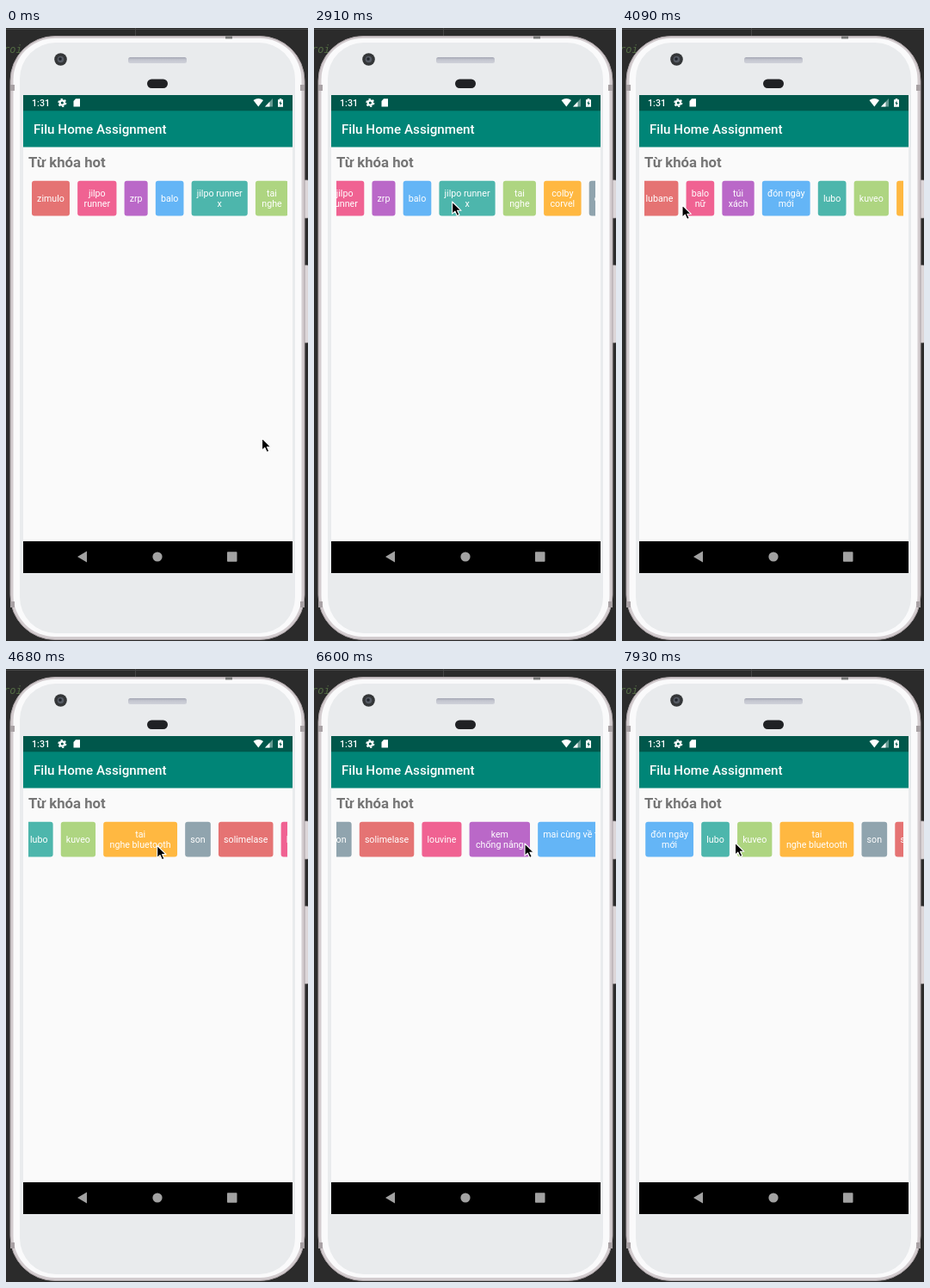
An HTML page that plays this animation: 351x713 px, repeating every 8 s.

```html
<!DOCTYPE html>
<html lang="vi">
<head>
<meta charset="utf-8">
<title>Keyword strip</title>
<style>
  html, body { margin: 0; width: 100%; height: 100%; overflow: hidden; background: #2b2b2b; }
  svg { display: block; width: 100vw; height: 100vh; font-family: Roboto, sans-serif; }
  #chips text { font-size: 10.66px; fill: #fff; text-anchor: middle; }
</style>
</head>
<body>
<svg viewBox="0 0 351 713">
  <defs>
    <linearGradient id="speaker" x2="0" y2="1">
      <stop offset="0" stop-color="#a3a5b2"/><stop offset=".4" stop-color="#c3c5cf"/><stop offset="1" stop-color="#d0d2da"/>
    </linearGradient>
    <clipPath id="strip"><rect x="26" y="170" width="301" height="60"/></clipPath>
  </defs>

  <!-- editor behind the phone -->
  <rect width="351" height="713" fill="#2b2b2b"/>
  <path d="M0 1.5H351M150.5 0V10" stroke="#464646"/>
  <text x="-3" y="29" font-family="'DejaVu Sans Mono', monospace" font-size="12" font-style="italic" fill="#526b43">roi</text>

  <!-- phone body -->
  <g fill="#dcd6d8" stroke="#b5adb0" stroke-width=".7">
    <rect x="344" y="177" width="8" height="44" rx="2"/>
    <rect x="344" y="276" width="8" height="90" rx="2"/>
  </g>
  <rect x="5" y="9.5" width="342" height="702" rx="52" fill="#d3cccf" stroke="#aaa2a5"/>
  <rect x="8.5" y="12" width="335" height="696" rx="48" fill="#fafafb"/>
  <rect x="16" y="17" width="320" height="687" rx="42" fill="#e9ebed"/>
  <path d="M5 69.5H10M342 69.5H347M5 670.5H10M342 670.5H347" stroke="#a8a1a4" stroke-width="7"/>
  <path d="M255 11H263" stroke="#777" stroke-width="3"/>
  <circle cx="63.5" cy="36.5" r="7.3" fill="#343638"/>
  <circle cx="63.5" cy="36.5" r="3.8" fill="#565b64"/>
  <circle cx="63" cy="36" r="1.8" fill="#20242b"/>
  <rect x="142" y="34" width="68" height="7" rx="2.5" fill="url(#speaker)"/>
  <rect x="164" y="59.5" width="24" height="10.5" rx="5.2" fill="#202124"/>

  <!-- screen -->
  <rect x="20" y="78" width="313" height="556" fill="#fafafa"/>
  <rect x="20" y="96" width="313" height="42.5" fill="#008577"/>
  <rect x="20" y="78" width="313" height="18.3" fill="#00574b"/>
  <rect x="20" y="597" width="313" height="37" fill="#000"/>

  <g fill="#fff">
    <text x="30" y="91" font-size="10.7" font-weight="500">1:31</text>
    <circle cx="65.3" cy="87" r="2.7" fill="none" stroke="#fff" stroke-width="2.2"/>
    <circle cx="65.3" cy="87" r="4.3" fill="none" stroke="#fff" stroke-width="1.5" stroke-dasharray="2.2 2.3"/>
    <path d="M81 82.3H86V91.5H78.5V85Z"/>
    <path d="M287.5 84Q293.3 79.8 299 84L293.3 91.5Z"/>
    <path d="M310 82V91.5H301Z" opacity=".4"/>
    <path d="M306.5 85.7V91.5H301Z"/>
    <path d="M316 83.2H317.8V82H320.2V83.2H322V91.8H316Z"/>
    <path d="M319.4 84.4L317.4 87.7H318.7V90.5L320.7 87H319.4Z" fill="#00574b"/>
    <text x="32" y="123" font-size="15.2" font-weight="500">Filu Home Assignment</text>
  </g>
  <text x="26" y="162" font-size="16.76" font-weight="700" fill="#757575">Từ khóa hot</text>
  <g fill="#a2a2a2">
    <path d="M83 615L94 608.5V621.5Z"/>
    <circle cx="176" cy="615" r="5.6"/>
    <rect x="257" y="609.3" width="11.5" height="11.5" rx=".7"/>
  </g>

  <g clip-path="url(#strip)"><g id="chips"></g></g>
  <path id="cursor" d="M0 0V14.2L3.3 11.2L5.7 16.5L8.3 15.3L5.9 10.3H10.4Z"
        fill="#000" stroke="#fff" stroke-width="1.1" stroke-linejoin="round"/>
</svg>

<script>
const LOOP = 8000, TICK = 147.1;
const PADDING = 6.1, GAP = 9.14, WORD_SPACE = 2.6, LINE_HEIGHT = 12.6;
const COLORS = ['#e57373', '#f06292', '#ba68c8', '#64b5f6', '#4db6ac', '#aed581', '#ffb841', '#90a4ae'];

// "|" breaks the line
const KEYWORDS = [
  'zimulo', 'jilpo|runner', 'zrp', 'balo', 'jilpo runner|x', 'tai|nghe', 'colby|corvel', 'odvar',
  'lubane', 'balo|nữ', 'túi|xách', 'đón ngày|mới', 'lubo', 'kuveo', 'tai|nghe bluetooth', 'son',
  'solimelase', 'louvine', 'kem|chống nắng', 'mai cùng về trong vườn nhà|ta'
];

// Turning points: [tick, x, y] of the pointer, [tick, offset] of the strip
const POINTER = [
  [0, 297.5, 477], [8, 268, 200], [12, 37, 185], [17, 262, 196], [20, 110, 205], [23, 230.5, 204],
  [27, 70, 206], [30, 235, 206], [33, 57, 204], [34, 228, 196], [37, 1, 199], [42, 245, 203],
  [47, 60, 203], [51, 131.5, 202]
];
const SCROLL = [[0, 0], [17, 0], [23, 210.5], [31, 622.3], [35, 849], [37, 896], [40, 896], [42, 816.5], [51, 552]];

// [start time, first tick, last tick]: the picture holds between runs
const RUNS = [[150, 1, 8], [1440, 9, 40], [6450, 41, 51]];

const chips = document.getElementById('chips');
const cursor = document.getElementById('cursor');

function add(tag, attributes, text = '') {
  const node = document.createElementNS('http://www.w3.org/2000/svg', tag);
  for (const name in attributes) node.setAttribute(name, attributes[name]);
  node.textContent = text;
  chips.append(node);
  return node;
}

// Each chip wraps its widest line; a wrapped line keeps its word space.
let left = 30;
KEYWORDS.forEach((label, i) => {
  const box = add('rect', { x: left, y: 177.7, height: 40.7, rx: 3, fill: COLORS[i % COLORS.length] });
  const lines = label.split('|').map((line, row, all) =>
    add('text', { y: 202 + (row - (all.length - 1) / 2) * LINE_HEIGHT }, line));
  const widths = lines.map((line, row) => line.getComputedTextLength() + row * WORD_SPACE);
  const width = Math.max(...widths) + 2 * PADDING;
  box.setAttribute('width', width);
  lines.forEach(line => line.setAttribute('x', left + width / 2));
  left += width + GAP;
});

function tickAt(time) {
  const run = RUNS.filter(([start]) => time >= start).pop();
  if (!run) return 0;
  const [start, first, last] = run;
  return Math.min(last, first + Math.floor((time - start + 6) / TICK));
}

function between(keys, tick) {
  const next = Math.max(1, keys.findIndex(key => key[0] >= tick));
  const a = keys[next - 1], b = keys[next];
  const part = (tick - a[0]) / (b[0] - a[0]);
  return a.map((value, i) => value + (b[i] - value) * part).slice(1);
}

function draw(now) {
  const tick = tickAt(now % LOOP);
  const [x, y] = between(POINTER, tick);
  const [offset] = between(SCROLL, tick);
  chips.setAttribute('transform', `translate(${-offset} 0)`);
  cursor.setAttribute('transform', `translate(${x} ${y})`);
  requestAnimationFrame(draw);
}
draw(0);
</script>
</body>
</html>
```
